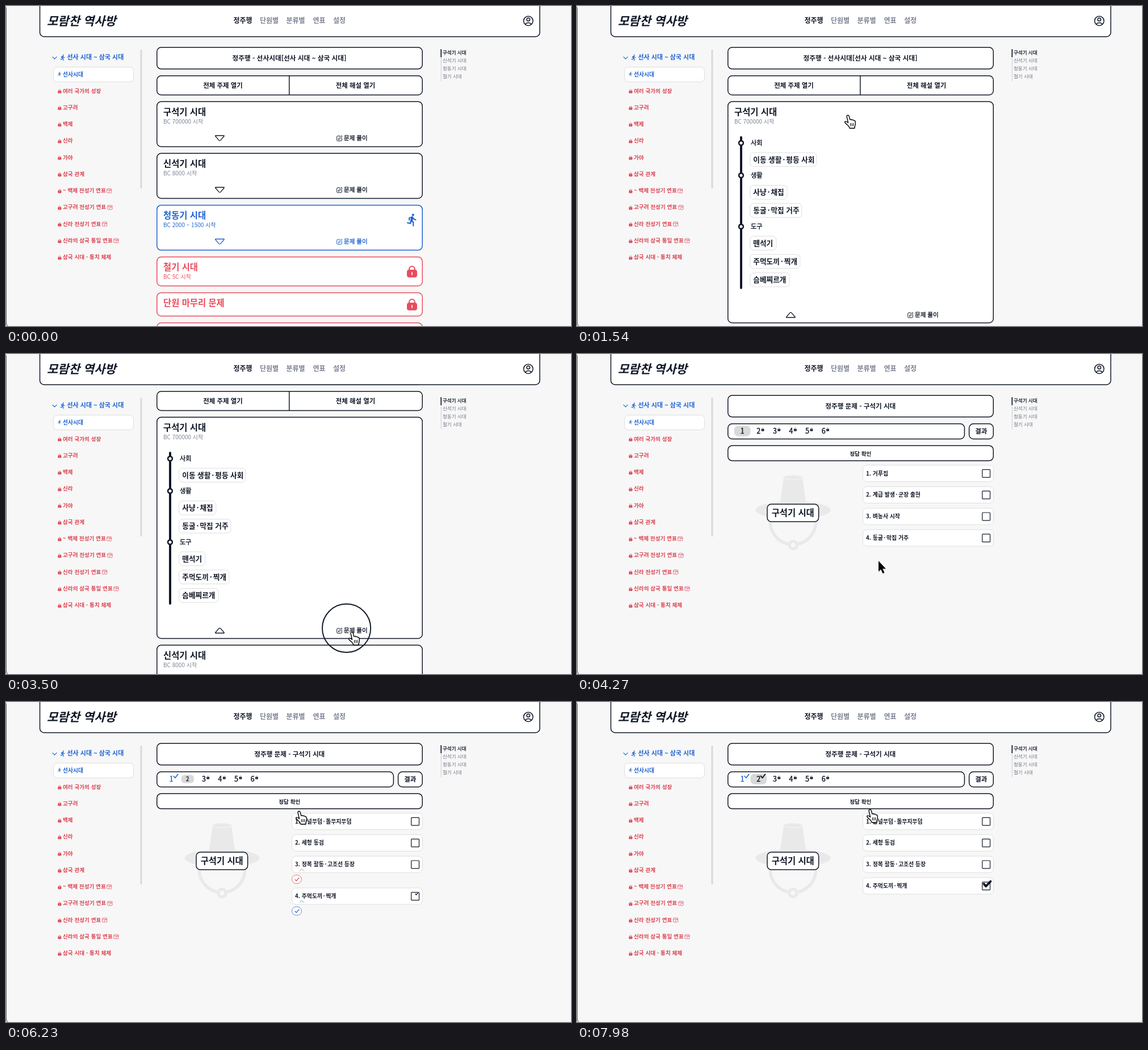
Write an HTML page that moves like this. It is 995 px wide and 563 px high and loops after 8 s.

```html
<!DOCTYPE html>
<html lang="ko">
<head>
<meta charset="utf-8">
<title>모람찬 역사방</title>
<style>
html, body { margin: 0; width: 100%; height: 100%; overflow: hidden; background: #f7f7f7; }
svg { display: block; width: 995px; height: 563px; }
text { font-family: "Noto Sans CJK KR", "Noto Sans CJK JP", "Noto Sans CJK", "Noto Sans", sans-serif; }
</style>
</head>
<body>
<svg viewBox="0 0 995 563" xmlns="http://www.w3.org/2000/svg">
  <rect width="995" height="563" fill="#f7f7f7"/>
  <g id="page"></g>
  <g id="frame"></g>
  <g id="pointer"></g>
</svg>
<script>
const LOOP = 8000, STEP = 70;
const INK = '#111827', GRAY = '#7d8394', LINE = '#dedede', BLUE = '#1f63d0', RED = '#ea4c5c', SIDE_RED = '#db4453';
const $ = id => document.getElementById(id);
const clamp = v => Math.max(0, Math.min(1, v));
const ramp = (t, from, len) => clamp((t - from) / len);

// y is the vertical middle of the glyphs; weight 500 is regular with a hairline outline
function text(x, y, s, size, weight = 600, fill = INK, anchor = 'start', more = '') {
  if (weight === 500) more += ` stroke="${fill}" stroke-width="${size * .03}"`;
  const body = String(s).replace(/·(.*)/, '<tspan dx=".15em">·</tspan><tspan dx=".15em">$1</tspan>');
  return `<text x="${x}" y="${y + size * .37}" font-size="${size}" font-weight="${weight === 500 ? 400 : weight}" fill="${fill}" text-anchor="${anchor}" ${more}>${body}</text>`;
}
const mid = (x, y, s, size, weight, fill) => text(x, y, s, size, weight, fill, 'middle');
const box = (x, y, w, h, r = 7.5, stroke = INK, width = 1.5, fill = '#fff') =>
  `<rect x="${x}" y="${y}" width="${w}" height="${h}" rx="${r}" fill="${fill}" stroke="${stroke}" stroke-width="${width}"/>`;
const line = (d, stroke = INK, width = 1.3, fill = 'none') =>
  `<path d="${d}" fill="${fill}" stroke="${stroke}" stroke-width="${width}" stroke-linecap="round" stroke-linejoin="round"/>`;
const at = (x, y, k, body) => `<g transform="translate(${x} ${y}) scale(${k})">${body}</g>`;

const lock = (x, y, k, c) => at(x, y, k,
  line('M4 9V6.5a5 5 0 0 1 10 0V9', c, 2) +
  `<rect y="7.5" width="18" height="13.5" rx="4" fill="${c}"/><path d="M9 12.5v3.5" stroke="#fff" stroke-width="1.8" stroke-linecap="round"/>`);
const runner = (x, y, k, c) => at(x, y, k,
  `<path fill="${c}" d="M13.5 5.5c1.1 0 2-.9 2-2s-.9-2-2-2-2 .9-2 2 .9 2 2 2zm-3.6 13.9l1-4.4 2.1 2v6h2v-7.5l-2.1-2 .6-3c1.3 1.5 3.3 2.5 5.5 2.5v-2c-1.9 0-3.5-1-4.3-2.4l-1-1.6c-.4-.6-1-1-1.7-1-.3 0-.5.1-.8.1l-5.2 2.2v4.7h2v-3.4l1.8-.7-1.6 8.1-4.9-1-.4 2z"/>`);
const calendar = (x, y) => at(x, y, 1,
  line('M4 -1V-2.6Q4 -3.7 2.9 -3.7H-2.9Q-4 -3.7 -4 -2.6V2.6Q-4 3.7 -2.9 3.7H-.8M-4 -1.5H4', SIDE_RED, .7) +
  `<circle cx="2" cy="1.6" r="2.4" fill="none" stroke="${SIDE_RED}" stroke-width=".7"/>`);
const fold = (y, c, up) => at(376.4, y, 1,
  `<g transform="scale(1 ${up ? -1 : 1})">${line('M-7.2 -4.5H7.2Q8.3 -4.3 7.4 -3.2L1.5 3.6Q0 5.2 -1.5 3.6L-7.4 -3.2Q-8.3 -4.3 -7.2 -4.5Z', c)}</g>`);
const solve = (y, c) => at(582, y - 5, 1,
  line('M5.5 1.2H2.2Q.7 1.2 .7 2.7V8.3Q.7 9.8 2.2 9.8H7.8Q9.3 9.8 9.3 8.3V5M3.4 7.2l.5-2L8 1.1q.9-.7 1.5 0t0 1.4L5.4 6.7z', c, 1)) +
  text(595, y, '문제 풀이', 10.5, 500, c);

function sidebar() {
  const rows = ['여러 국가의 성장', '고구려', '백제', '신라', '가야', '삼국 관계', '~ 백제 전성기 연표',
    '고구려 전성기 연표', '신라 전성기 연표', '신라의 삼국 통일 연표', '삼국 시대 - 통치 체제'];
  const marks = { 6: 181.7, 7: 183, 8: 173.7, 9: 194 };
  let s = line('M82 89.6l3.6 3.6 3.6-3.6', BLUE, 1.2) + runner(93.8, 84.6, .52, BLUE) +
    text(107.5, 90, '선사 시대 ~ 삼국 시대', 11, 600, BLUE) +
    box(83.5, 107.5, 141, 26, 7, LINE, 1) + runner(90.2, 115.3, .36, BLUE) + text(100, 120, '선사시대', 9.8, 700, BLUE) +
    '<rect x="236.5" y="77" width="3" height="244" rx="1" fill="#d9d9d9"/>';
  rows.forEach((name, i) => {
    const y = 149 + i * 29.27;
    s += lock(91.4, y - 2.6, .34, SIDE_RED) + text(100, y, name, 9.65, 600, SIDE_RED);
    if (marks[i]) s += calendar(marks[i], y + .5);
  });
  return s;
}

function header() {
  const nav = [[400.5, '정주행'], [447, '단원별'], [493.5, '분류별'], [540.5, '연표'], [576, '설정']];
  return box(59.6, -20, 880.4, 74) +
    text(72, 26, '모람찬 역사방', 21, 900, INK, 'start', 'font-style="italic"') +
    nav.map(([x, s], i) => text(x, 26, s, 12, i ? 600 : 700, i ? GRAY : INK)).join('') +
    `<circle cx="919.8" cy="26.2" r="8.2" fill="none" stroke="${INK}" stroke-width="1.5"/>` +
    `<circle cx="919.8" cy="23.8" r="2.8" fill="none" stroke="${INK}" stroke-width="1.5"/>` +
    line('M914.6 32q1.6-2.6 5.2-2.6t5.2 2.6', INK, 1.5);
}

function contents() {
  return '<rect x="765.8" y="90" width="1" height="42" fill="#c9cbd1"/>' +
    `<rect x="765.4" y="76" width="1.7" height="14" fill="${INK}"/>` +
    ['구석기 시대', '신석기 시대', '청동기 시대', '철기 시대']
      .map((s, i) => text(769, 82 + i * 14, s, 8.5, i ? 400 : 500, i ? '#6f7480' : INK)).join('');
}

function timeline() {
  const heads = [[241, '사회'], [298, '생활'], [388, '도구']];
  const chips = [[258, 117, '이동 생활·평등 사회'], [315.5, 65, '사냥·채집'], [347.5, 91, '동굴·막집 거주'],
    [405, 46, '뗀석기'], [437, 88, '주먹도끼·찍개'], [469.5, 69.5, '슴베찌르개']];
  return line('M289 231V496', INK, 4) +
    heads.map(([y, s]) => `<circle cx="289" cy="${y}" r="3.9" fill="#fff" stroke="${INK}" stroke-width="2.6"/>` +
      text(306, y, s, 11.2, 500)).join('') +
    chips.map(([y, w, s]) => box(304.8, y, w, 24.5, 6, LINE, 1) + text(310.3, y + 12.2, s, 12.65, 600)).join('');
}

function card(y, h, c, title, sub, icon) {
  let s = box(265.8, y, 467.4, h, 7.5, c) + text(277, y + 18.2, title, 15.4, 700, c);
  if (sub) s += text(277, y + 35, sub, 10, 400, c === INK ? GRAY : c);
  if (icon === 'lock') s += lock(706, y + h / 2 - 10.5, 1, c);
  if (icon === 'run') s += runner(703, y + 13.6, 1.02, c);
  return s;
}

function lessons(t) {
  const open = t >= 1470, drop = open ? 310 : 0;
  const scroll = 57 * (1 - (1 - ramp(t, 2240, 350)) ** 1.67);
  const foot = (y, c, up) => fold(y, c, up) + solve(y, c);
  const s = box(265.8, 72.8, 467.4, 38) + mid(499, 91.5, '정주행 - 선사시대[선사 시대 ~ 삼국 시대]', 11.7, 700) +
    box(265.8, 122.8, 467.4, 33.6) + line('M498.8 123V156', INK, 1.5) +
    mid(382, 140, '전체 주제 열기', 11.4, 700) + mid(615.5, 140, '전체 해설 열기', 11.4, 700) +
    card(168.3, 79.2 + drop, INK, '구석기 시대', 'BC 700000 시작') +
    (open ? timeline() : '') + foot(232.5 + drop + (open ? 1 : 0), INK, open) +
    `<g transform="translate(0 ${drop})">` +
    card(259.3, 79.2, INK, '신석기 시대', 'BC 8000 시작') + foot(323.5, INK) +
    card(350.4, 79.2, BLUE, '청동기 시대', 'BC 2000 ~ 1500 시작', 'run') + foot(414.5, BLUE) +
    card(441.5, 51, RED, '철기 시대', 'BC 5C 시작', 'lock') +
    card(504.5, 41, RED, '단원 마무리 문제', '', 'lock') +
    box(265.8, 557.5, 467.4, 60, 7.5, RED) + '</g>';
  return `<g transform="translate(0 ${-scroll})">${s}</g>`;
}

function hat() {
  const c = '#e9e9e9';
  return `<ellipse cx="380.5" cy="274.5" rx="66" ry="15.5" fill="${c}"/>` +
    `<path d="M364 218H397L403 260Q380 268 358 260Z" fill="${c}"/>` +
    `<ellipse cx="380.5" cy="217" rx="17" ry="4" fill="${c}" stroke="#f7f7f7"/>` +
    `<path d="M340 296A41 41 0 0 0 371 334M390 334A41 41 0 0 0 421 296" fill="none" stroke="${c}" stroke-width="5.5"/>` +
    `<circle cx="380.5" cy="336" r="6.8" fill="none" stroke="${c}" stroke-width="5"/>`;
}

function numbers(t, second) {
  const x = i => 291.2 + i * 28.6, cur = second ? 1 : 0;
  const grow = ramp(t, second ? 6090 : 3500, 180);
  const tick = (i, c, w) => line(`M${x(i) + 3.8} 130.3l3 3.2 4.8-6.5`, c, w);
  let s = at(x(cur), 135.5, grow, '<rect x="-14.4" y="-9.2" width="28.8" height="18.4" rx="7" fill="#d9d9d9"/>');
  for (let i = 0; i < 6; i++) {
    const size = i === cur ? 12.5 * grow : 12.5;
    s += mid(x(i), 135.3, i + 1, size, 500, second && !i ? BLUE : INK);
    if (i > cur) s += lock(x(i) + 4.8, 129.8, .28, INK);
  }
  if (t >= 5320) s += tick(0, t >= 5740 ? BLUE : INK, 1.5);
  if (t >= 7700) s += tick(1, INK, 2);
  return s;
}

function options(t, second) {
  const names = second
    ? ['돌널무덤·돌무지무덤', '세형 동검', '정복 활동·고조선 등장', '주먹도끼·찍개']
    : ['거푸집', '계급 발생·군장 출현', '벼농사 시작', '동굴·막집 거주'];
  const check = second ? Math.max(1 - ramp(t, 6090, 215), ramp(t, 7630, 210)) : ramp(t, 5250, 210);
  let y = 210, s = '';
  names.forEach((name, i) => {
    const gap = 29 * ramp(t, 5670, 210) * (1 - ramp(t, 6090, i < 2 ? 140 : 370));
    s += box(503.5, y - 14.5, 230, 29, 7, LINE, 1) + text(509, y, `${i + 1}. ${name}`, 9.85, 600) +
      box(713.7, y - 6.7, 13.8, 13.8, 1, INK, 1.2);
    if (i === 3 && check > 0) s += at(723.5, y - 4, check, line('M-7 0.5l3.6 4.2L4.8 -4', INK, 4));
    if (gap > 4) {
      const c = i < 3 ? '#dc5a58' : '#3a72cf', top = y + 18.7, h = gap - 3;
      s += line(`M517.5 ${y + 11.5}l3.6-4 3.6 4`, c, .7) +
        box(503.5, top, h + 2, h, h / 2, c, .8) +
        line(`M${501 + h / 2 + .5} ${top + h / 2 + .2}l2.4 2.6 4.8-5.6`, c, 1.3);
    }
    y += 37.85 + gap;
  });
  return s;
}

function quiz(t) {
  const second = t >= 6160;
  return box(265.8, 72.8, 467.4, 38) + mid(499.3, 91.5, '정주행 문제 - 구석기 시대', 11.6, 700) +
    box(265.8, 122.8, 416.6, 26.6) + box(690.6, 122.8, 42.6, 26.6) + mid(711.7, 135.5, '결과', 11.4, 600) +
    numbers(t, second) +
    box(265.8, 161.2, 467.4, 26.6) + mid(499.3, 175, '정답 확인', 9.6, 700) +
    hat() + box(335, 264.2, 90.6, 30.8, 7) + mid(380.2, 279.3, '구석기 시대', 15.4, 700) +
    options(t, second);
}

// time, x, y of the hot spot, 1 = hand
const PATH = [
  [0, 700, 590, 0], [420, 640, 420, 0], [630, 560, 245, 1], [980, 528, 203, 1], [1120, 528, 203, 1],
  [1330, 477, 192, 1], [1890, 477, 192, 0], [2100, 478, 291, 0], [2730, 478, 291, 0], [3290, 600, 482, 1],
  [3500, 609, 489, 1], [3640, 609, 489, 0], [4270, 531, 364, 0], [4410, 533, 354, 0], [4760, 586, 268, 1],
  [5180, 560, 318, 1], [5460, 560, 318, 1], [5740, 516, 189, 1], [6160, 516, 192, 1], [6440, 516, 192, 1],
  [7210, 564, 322, 1], [7770, 560, 320, 1], [7980, 516, 189, 1], [8000, 516, 189, 1]];

function cursor(t) {
  const i = Math.max(1, PATH.findIndex(p => p[0] > t));
  const [t0, x0, y0, hand] = PATH[i - 1], [t1, x1, y1] = PATH[i];
  let u = (t - t0) / (t1 - t0);
  u = u * u * (3 - 2 * u);
  const x = x0 + (x1 - x0) * u, y = y0 + (y1 - y0) * u;
  const grip = 'M7.5 14.5L5.2 4.2Q4.7 1.6 6.6 1.1 8.500 .8 9.200 3.100L10.800 9q2.200-1.200 3.400.6 2.200-1 3.200.9 2.300-.4 2.700 1.800.5 3.800-.4 6.200l-1 5.500h-8.600q-1-3-3.200-5.200Q4.200 16.800 2 14.200 1 12.200 3 11.900 4.600 11.900 7.500 14.500z';
  const arrow = 'M0 0V18.800l4.200-3.900 3.100 7.200 3.100-1.400-3.100-7h5.600z';
  const shadow = d => `<path d="${d}" transform="translate(.6 1.6)" fill="#000" opacity=".18"/>`;
  return hand
    ? at(x - 7, y - 1, 1, shadow(grip) + line(grip, '#000', 1.4, '#fff') + line('M11.500 15.500v4.500M14 15.500v4.500M16.500 15.500v4.500', '#000', 1))
    : at(x, y, 1, shadow(arrow) + `<path d="${arrow}" fill="#000" stroke="#fff" stroke-width="1.3" paint-order="stroke"/>`);
}

function ring(t) {
  const r = 42.6 * ramp(t, 3360, 140);
  return r && t < 3570 ? `<circle cx="599.6" cy="482.4" r="${r}" fill="none" stroke="${INK}" stroke-width="1.9"/>` : '';
}

function draw(t) {
  $('page').innerHTML = t < 3570 ? lessons(t) : quiz(t);
  $('pointer').innerHTML = ring(t) + cursor(t);
}

$('frame').innerHTML = line('M.3 3V557Q.5 561 3 563', '#3c3f46', 1) + header() + sidebar() + contents();

let last = -1;
function tick(now) {
  const t = Math.floor((now % LOOP) / STEP) * STEP;
  if (t !== last) draw(last = t);
  requestAnimationFrame(tick);
}
draw(0);
requestAnimationFrame(tick);
</script>
</body>
</html>
```
